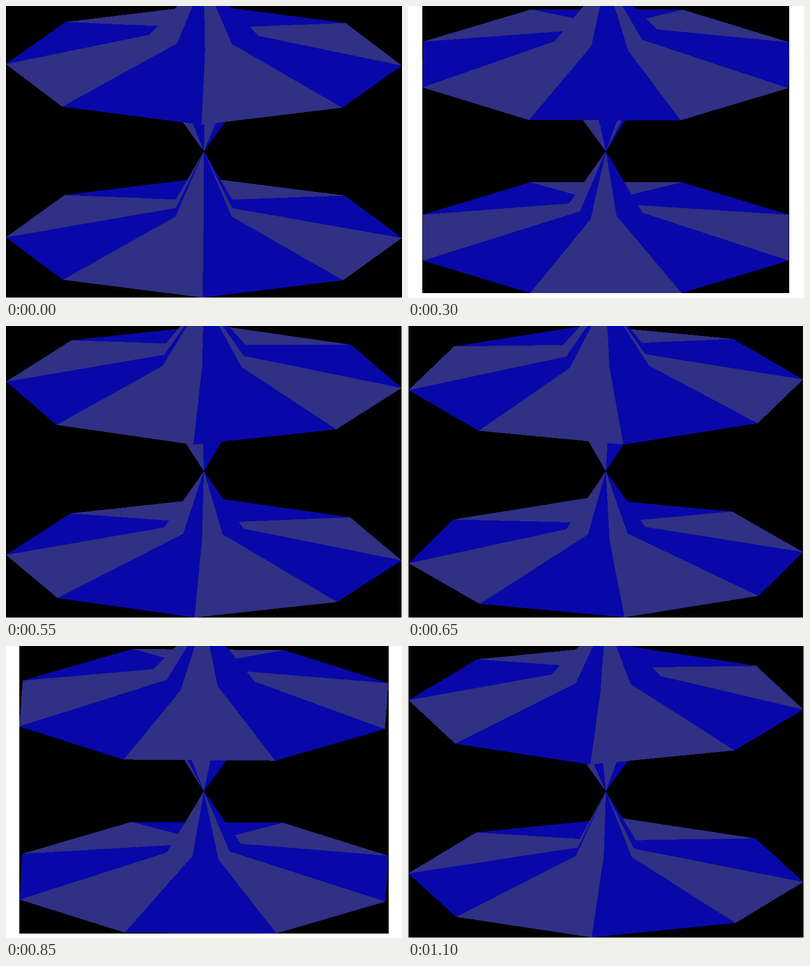
An HTML page that plays this animation: 803x592 px, repeating every 1.15 s.

```html
<!DOCTYPE html>
<html lang="en">
<head>
<meta charset="utf-8">
<title>Rotating cones</title>
<style>
  html, body { margin: 0; width: 100%; height: 100%; overflow: hidden; background: #fff; }
  svg { display: block; width: 803px; height: 592px; }
</style>
</head>
<body>
<svg id="stage" viewBox="0 0 803 592" shape-rendering="crispEdges"></svg>
<script>
const BLUE = '#0808a8', LIGHT = '#303085';
const STEP = 50, STEPS = 23, CENTER = 401.2, TILT = 0.3025, RIM = 401.5;
const rad = deg => deg * Math.PI / 180;

const stage = document.getElementById('stage');
const add = tag => stage.appendChild(document.createElementNS('http://www.w3.org/2000/svg', tag));
const backdrop = add('rect');
const faces = Array.from({ length: 40 }, () => add('polygon'));

const project = (along, across, deg, y) => {
  const s = Math.sin(rad(deg)), c = Math.cos(rad(deg));
  return [CENTER + along * s + across * c, y + TILT * (along * c - across * s)];
};

const eight = make => Array.from({ length: 8 }, (_, k) => make(k));

const rim = (turn, y) => eight(k => project(RIM, 0, turn + 45 * k, y));

// Corners and edge midpoints of a rectangle whose first axis points at `axis` degrees.
const box = (a, b, axis, turn, y) => eight(k => {
  const local = rad(45 * k - axis);
  return project(a * Math.round(Math.cos(local)), b * Math.round(Math.sin(local)), turn + axis, y);
});

function turnAt(step) {
  const wobble = 0.5 + 0.5 * Math.cos(2 * Math.PI * (step - 7) / STEPS);
  return 90 * step / STEPS - wobble;
}

function draw(step) {
  const turn = turnAt(step);
  const depth = k => Math.cos(rad(turn + 45 * k + 22.5));
  const backToFront = eight(k => k).sort((a, b) => depth(a) - depth(b));
  let used = 0;

  const band = (outline, parity) => {
    for (const k of backToFront) {
      const face = faces[used++];
      face.setAttribute('points', outline(k, (k + 1) % 8).map(p => p.join()).join(' '));
      face.setAttribute('fill', k % 2 === parity ? BLUE : LIGHT);
    }
  };
  const flange = (outer, inner, parity) =>
    band((k, n) => [outer[k], outer[n], inner[n], inner[k]], parity);
  const cone = (tipY, ring, parity) =>
    band((k, n) => [[CENTER, tipY], ring[k], ring[n]], parity);

  const lowRim = rim(turn, 469.7), highRim = rim(turn - 0.35, 119.3);
  const lowRing = box(57, 57, 0, turn, 409.7);
  const highRing = y => box(80.6, 76.2, 45, turn, y);

  flange(lowRim, lowRing, 0);
  cone(294.6, lowRing, 0);
  cone(294.6, highRing(141.6), 1);
  flange(highRim, highRing(59.5), 1);
  cone(-55.5, highRing(59.5), 1);

  const xs = [...lowRim, ...highRim].map(p => p[0]);
  const left = Math.max(0, Math.round(Math.min(...xs)));
  const right = Math.min(803, Math.round(Math.max(...xs)));
  backdrop.setAttribute('x', left);
  backdrop.setAttribute('width', right - left);
  backdrop.setAttribute('height', Math.round(Math.max(...lowRim.map(p => p[1]))));
}

const start = performance.now();
function tick() {
  draw(Math.floor((performance.now() - start) / STEP) % STEPS);
  requestAnimationFrame(tick);
}
tick();
</script>
</body>
</html>
```
